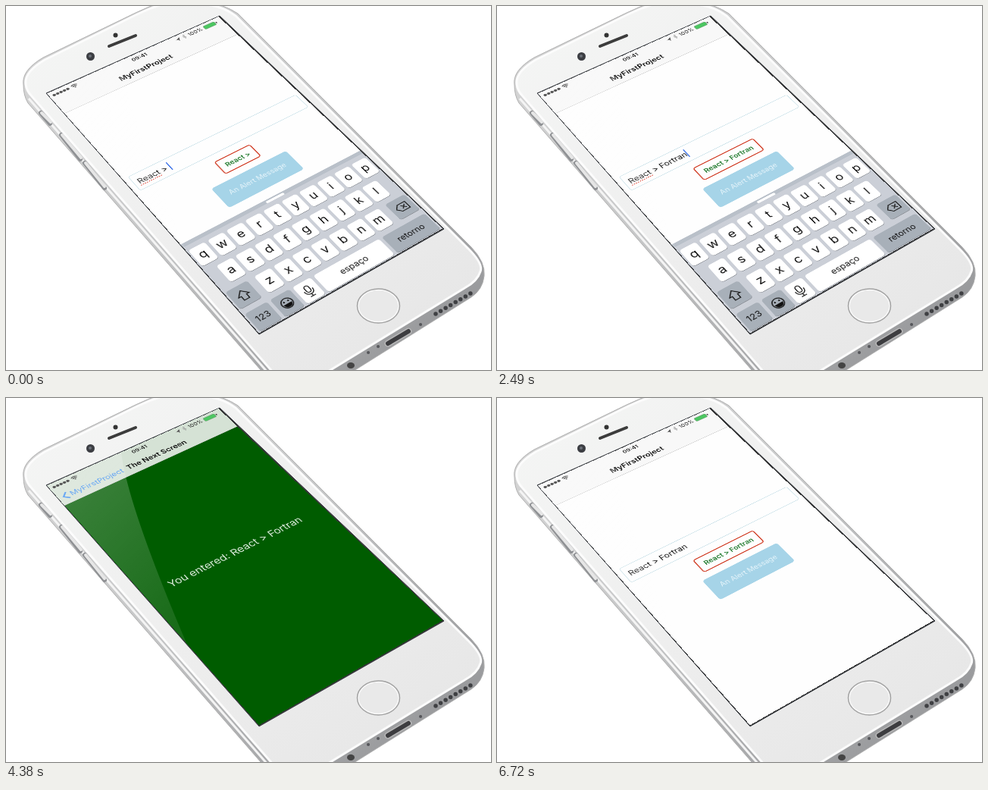
Animation, 640 px wide and 480 px high, one loop 6.99 s. Source, as an HTML page:

```html
<!DOCTYPE html>
<html lang="en">
<head>
<meta charset="utf-8">
<title>Phone demo</title>
<style>
html, body { margin: 0; width: 100%; height: 100%; overflow: hidden; background: #fff; }
#stage { position: relative; width: 640px; height: 480px; overflow: hidden; }
#stage > svg { position: absolute; left: 0; top: 0; }
#screen { position: absolute; left: 0; top: 0; width: 375px; height: 667px; overflow: hidden;
  transform-origin: 0 0; background: #fff; font: 16px Inter, sans-serif; color: #111; white-space: pre; }
#screen div, #screen svg { position: absolute; box-sizing: border-box; }
#nav svg { left: 0; top: 0; }
.full { left: 0; top: 0; width: 375px; height: 667px; }
#home { background: #fefefe; }
#input { left: 10px; top: 262px; width: 357px; height: 40px; padding-left: 7px; line-height: 38px;
  border: 1px solid #bfdbe4; border-radius: 4px; }
#word.misspelt { text-decoration: underline dotted #e04a3a 2px; text-underline-offset: 3px; }
#caret { display: inline-block; width: 2px; height: 21px; background: #3f74e8; vertical-align: -4px; }
#submit { left: 188px; top: 318px; height: 36px; padding: 0 11px; line-height: 32px; transform: translateX(-50%);
  border: 2px solid #d2432c; border-radius: 5px; font-size: 13.7px; font-weight: 600; color: #1f7a2c; white-space: normal; }
#submit span { white-space: nowrap; }
#alert { left: 111px; top: 368px; width: 157px; height: 54px; line-height: 52px; text-align: center;
  border-radius: 5px; background: #a6d4e8; color: #e6f4fa; font-size: 14px; }
#dim { background: #000; }
#next { background: #005c00; box-shadow: -2px 0 6px #0003; }
#entered { left: 0; top: 320px; width: 372px; text-align: center; font-size: 20.5px; line-height: 30px; color: #e4f0e4; }
#nav { left: 0; top: 0; width: 375px; height: 64px; background: #f7f7f7dc; border-bottom: 1px solid #0003; }
#nav div { top: 32px; line-height: 22px; }
#title, #nextTitle { font-weight: 600; }
#back { color: #3b8df2; }
#bar { left: 0; top: 443px; width: 375px; height: 224px; background: #c2c7d0d8; border-top: 8px solid #b9c0c9; }
#handle { left: 169px; top: 446px; width: 37px; height: 5px; border-radius: 3px; background: #fff; }
.key { height: 42px; border-radius: 5px; background: #fff; box-shadow: 0 1px #878b92;
  line-height: 41px; text-align: center; font-size: 23px; }
.dark { background: #a8b0b9; }
.small { font-size: 16px; }
#popup { width: 58px; height: 105px; filter: drop-shadow(0 1px 2px #0005); }
</style>
</head>
<body>
<div id="stage">
  <svg width="640" height="480">
    <defs>
      <linearGradient id="metal" x1="0" y1="0" x2="1" y2="1">
        <stop offset="0" stop-color="#d8d8d8"/><stop offset=".45" stop-color="#c6c7c8"/>
        <stop offset=".8" stop-color="#a2a3a5"/><stop offset="1" stop-color="#8c8d90"/>
      </linearGradient>
      <linearGradient id="face" x1="0" y1="0" x2="1" y2="1">
        <stop offset="0" stop-color="#f5f6f5"/><stop offset=".5" stop-color="#eee"/><stop offset="1" stop-color="#e5e5e5"/>
      </linearGradient>
    </defs>
    <path d="M23 104Q20 85 49 68L171 9Q190 0 205-5H265Q288-2 306 10L614 318Q633 338 631 356Q629 374 614 384L448 488H343L29 128Q23 118 23 104Z" fill="url(#metal)" stroke="#b0b0b0"/>
    <path d="M30 122L346 484" stroke="#f4f4f4" stroke-width="3"/>
    <path d="M46 141L58 155M73 170L98 202M104 207L130 240" stroke="#8f9194" stroke-width="6" stroke-linecap="round"/>
    <path d="M47 141L59 153M74 170L99 200M105 207L130 238" stroke="#e6e6e6" stroke-width="4" stroke-linecap="round"/>
    <path d="M26 103Q24 87 51 71L173 11Q190 3 205-2H263Q286 0 303 13L610 320Q630 340 626 350Q622 363 605 372L420 485H354L34 119Q27 112 26 103Z" fill="url(#face)" stroke="#fcfcfc" stroke-width="3"/>
    <path d="M136 53L171 39" stroke="#3c3c3c" stroke-width="4" stroke-linecap="round"/>
    <circle cx="111.500" cy="66.500" r="5.500" fill="#3b3d42"/><circle cx="111" cy="66" r="2" fill="#6b7078"/>
    <circle cx="144.500" cy="38.500" r="3" fill="#333"/>
    <g fill="none"><ellipse cx="491.500" cy="395.500" rx="27.500" ry="22" fill="#e9e9e9" stroke="#a2a2a2" stroke-width="2.500"/>
      <ellipse cx="491.500" cy="395.500" rx="26.500" ry="21" stroke="#fafafa" stroke-width="1.500"/></g>
    <path d="M504 445L531 429" stroke="#b9b9b9" stroke-width="9" stroke-linecap="round"/>
    <path d="M504 445L531 429" stroke="#3d3d40" stroke-width="6" stroke-linecap="round"/>
    <path d="M567 406L613 379" stroke="#3f4043" stroke-width="5.500" stroke-linecap="round" stroke-dasharray="0 7.600"/>
    <path d="M478 457h.1M491 449h.1M547 420h.1" stroke="#55565a" stroke-width="4" stroke-linecap="round"/>
    <ellipse cx="455" cy="474" rx="5" ry="4" fill="#444"/>
    <path d="M53 115L282 13L578 294L334 433Z" fill="#333" stroke="#363a40" stroke-linejoin="round"/>
  </svg>

  <div id="screen">
    <div id="home" class="full">
      <div id="input"><span id="word">React</span><span id="rest"></span><span id="caret"></span></div>
      <div id="submit"><span id="label"></span></div>
      <div id="alert">An Alert Message</div>
      <div id="dim" class="full"></div>
    </div>
    <div id="next" class="full"><div id="entered">You entered: React &gt; Fortran</div></div>
    <div id="keyboard" class="full">
      <div id="bar"></div><div id="handle"></div>
    </div>
    <div id="nav">
      <div id="title" style="left:127px">MyFirstProject</div>
      <div id="back" style="left:24px">MyFirstProject</div>
      <div id="nextTitle" style="left:143px">The Next Screen</div>
      <svg id="chevron" width="24" height="64" fill="none" stroke="#3b8df2" stroke-width="3"><path d="M19 34L10 43L19 52"/></svg>
      <svg width="375" height="22" font-size="12" fill="#222">
        <path d="M9 11H38" stroke="#222" stroke-width="6" stroke-linecap="round" stroke-dasharray="0 7"/>
        <path d="M45 9Q51 4 57 9M47 12Q51 8 55 12" fill="none" stroke="#222" stroke-width="1.800"/><circle cx="51" cy="14" r="1.600"/>
        <text x="189" y="16" text-anchor="middle" font-weight="600">09:41</text>
        <path d="M270 12L280 7L276 17L275 12Z" fill="#555"/>
        <path d="M286 9L292 14L289 17V6L292 9L286 14" fill="none" stroke="#999"/>
        <text x="298" y="16">100%</text>
        <rect x="334" y="7" width="25" height="10" rx="2" fill="#4cc661" stroke="#6a9a70"/><rect x="361" y="10" width="2" height="4"/>
      </svg>
    </div>
  </div>

  <svg width="640" height="480">
    <linearGradient id="glare" x1="0" y1="0" x2=".8" y2="1">
      <stop offset="0" stop-color="#fff" stop-opacity=".26"/><stop offset="1" stop-color="#fff" stop-opacity=".1"/>
    </linearGradient>
    <path d="M54 115L152 71Q160 140 238 323Z" fill="url(#glare)"/>
  </svg>
</div>

<script>
const LOOP = 6990;
const $ = id => document.getElementById(id);
const keyboard = $('keyboard');
const keys = {};

// Maps the flat 375 x 667 screen onto its four corners on the phone.
function project(el, w, h, [x0, y0], [x1, y1], [x2, y2], [x3, y3]) {
  const sx = x0 - x1 + x2 - x3, sy = y0 - y1 + y2 - y3;
  const ax = x1 - x2, ay = y1 - y2, bx = x3 - x2, by = y3 - y2;
  const det = ax * by - bx * ay;
  const g = (sx * by - bx * sy) / det, k = (ax * sy - sx * ay) / det;
  const m = [
    (x1 - x0 + g * x1) / w, (y1 - y0 + g * y1) / w, 0, g / w,
    (x3 - x0 + k * x3) / h, (y3 - y0 + k * y3) / h, 0, k / h,
    0, 0, 1, 0, x0, y0, 0, 1];
  el.style.transform = `matrix3d(${m.map(v => v.toFixed(9))})`;
}

function addKey(x, row, width, text = '', type = '') {
  const el = document.createElement('div');
  const top = 461 + row * 54;
  el.className = 'key ' + type;
  el.textContent = text;
  el.style.cssText = `left:${x}px;top:${top}px;width:${width}px`;
  keyboard.append(el);
  return { el, x: x + width / 2, top };
}

['qwertyuiop', 'asdfghjkl', 'zxcvbnm'].forEach((letters, row) =>
  [...letters].forEach((c, i) => keys[c] = addKey([3, 21.75, 59.25][row] + i * 37.5, row, 31.5, c)));
const shift = addKey(3, 2, 42, '', 'dark').el;
addKey(330, 2, 42, '', 'dark');
addKey(3, 3, 43, '123', 'dark small');
addKey(52, 3, 38, '', 'dark');
addKey(96, 3, 36);
addKey(138, 3, 136, 'espaço', 'small');
addKey(280, 3, 92, 'retorno', 'dark small');

keyboard.insertAdjacentHTML('beforeend', `
  <svg class="full" fill="none" stroke="#111" stroke-width="1.7">
    <path id="arrow" d="M24 580L34 591H29V600H19V591H14Z"/>
    <path d="M339 590L346 582H362V598H346ZM350 586L358 594M358 586L350 594"/>
    <circle cx="71" cy="644" r="10"/><path d="M64 646H78Q76 652 71 652T64 646Z" fill="#111"/>
    <path d="M67 639V642M75 639V642" stroke-width="2.5"/>
    <rect x="110" y="633" width="8" height="14" rx="4"/><path d="M106 642Q106 651 114 651T122 642M114 651V656M109 656H119"/>
  </svg>
  <svg id="popup"><path fill="#fff" d="M7 0H51Q58 0 58 7V46Q58 53 51 58Q45 63 45 70V101Q45 105 41 105H17Q13 105 13 101V70Q13 63 7 58Q0 53 0 46V7Q0 0 7 0Z"/>
    <text id="popupLetter" x="29" y="41" font-size="34" text-anchor="middle" fill="#111"></text></svg>`);

project($('screen'), 375, 667, [54, 115.5], [280.5, 14], [576, 293.5], [334, 431.5]);

// Letter, press time, release time
const taps = [['F', 480, 600], ['o', 780, 890], ['r', 980, 1080], ['t', 1200, 1320],
  ['r', 1395, 1500], ['a', 1700, 1810], ['n', 2150, 2310]];

// Critically damped spring from 0 to 1
function spring(elapsed) {
  const s = Math.max(0, elapsed) * 0.0201;
  return 1 - Math.exp(-s) * (1 + s);
}
const move = (el, x, y = 0) => el.style.transform = `translate(${x}px,${y}px)`;

function drawTyping(t) {
  const typed = taps.filter(tap => t >= tap[2]).map(tap => tap[0]).join('');
  $('rest').textContent = ' > ' + typed;
  $('label').textContent = 'React > ' + typed;
  $('word').className = t < 3390 ? 'misspelt' : '';
  $('caret').style.opacity = Math.min(1, Math.max(0, (3090 - t) / 90));

  const upper = t >= 120 && t < 600;
  for (const c in keys) keys[c].el.textContent = upper ? c.toUpperCase() : c;
  shift.style.background = upper ? '#fff' : '';
  $('arrow').style.fill = upper ? '#111' : 'none';

  const pressed = taps.find(([, down, up]) => t >= down && t < up);
  $('popup').style.display = pressed ? '' : 'none';
  if (pressed) {
    const key = keys[pressed[0].toLowerCase()];
    $('popup').style.left = key.x - 29 + 'px';
    $('popup').style.top = key.top - 63 + 'px';
    $('popupLetter').textContent = pressed[0];
  }
}

function drawNavigation(t) {
  const p = t < 6030 ? spring(t - 3417) : 1 - spring(t - 6108);
  move($('home'), -112.5 * p);
  $('dim').style.opacity = 0.13 * p * p;
  move($('next'), 375 * (1 - p));
  $('next').style.visibility = p < 0.001 ? 'hidden' : '';
  move(keyboard, 0, 229 * spring(t - 3397));

  move($('title'), -103 * p);
  $('title').style.opacity = (1 - p) ** 3;
  move($('back'), 103 * (1 - p));
  $('back').style.opacity = $('chevron').style.opacity = p ** 8;
  move($('nextTitle'), 225 * (1 - p));
  $('nextTitle').style.opacity = p;
}

function frame() {
  const t = performance.now() % LOOP;
  drawTyping(t);
  drawNavigation(t);
  requestAnimationFrame(frame);
}
frame();
</script>
</body>
</html>
```
